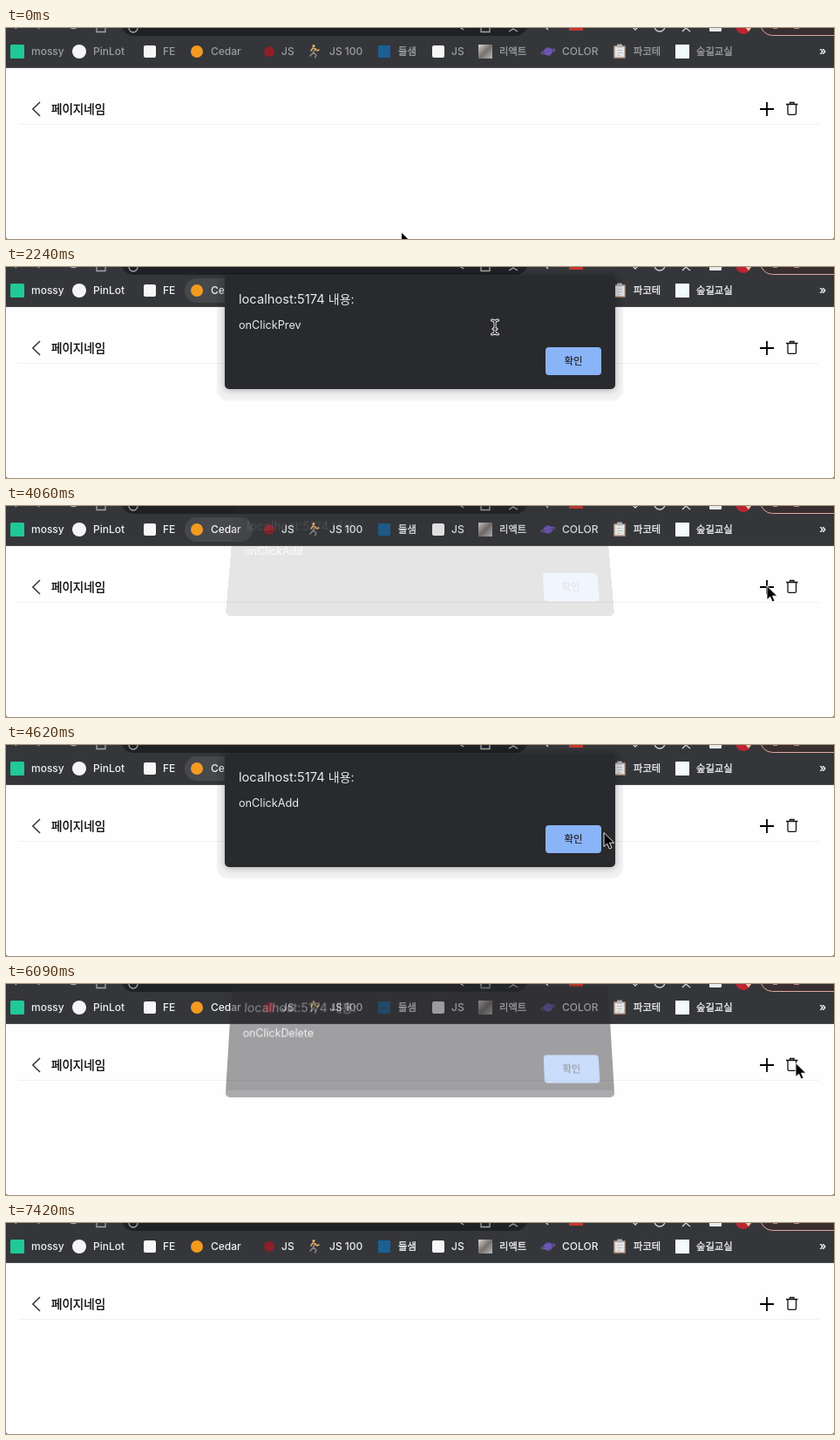
Animation of 950x242 px, one loop 7700 ms. Source, as an HTML page:

```html
<!DOCTYPE html>
<html lang="ko">
<head>
<meta charset="utf-8">
<title>Page header alerts</title>
<style>
  html, body { margin: 0; width: 950px; height: 242px; overflow: hidden; background: #fefefe; }
  svg { position: absolute; left: 0; top: 0; display: block; overflow: visible; }
  #stage { position: relative; width: 950px; height: 242px; overflow: hidden; }
  text { font-family: Inter, "Noto Sans CJK KR", "Noto Sans CJK", sans-serif; white-space: pre; }
  #marks text { font-size: 12px; font-weight: 500; }
  /* a hairline stroke gives the Hangul a medium weight */
  #marks text.ko { font-size: 11.3px; stroke-width: .3px; }
  #dialog {
    position: absolute; left: 251px; top: 10px; width: 448px; height: 130px;
    border-radius: 5px; background: #292a2d; transform-origin: 50% 100%;
  }
  #dialog.settled { box-shadow: 0 1px 7px rgba(0,0,0,.3), 0 4px 2px 9px rgba(0,0,0,.055); }
  #strip {
    position: absolute; left: 0; right: 0; bottom: 0; height: 8px;
    border-radius: 0 0 5px 5px; background: rgba(255,255,255,.12);
  }
</style>
</head>
<body>
<div id="stage">
  <svg width="950" height="242" viewBox="0 0 950 242">
    <rect width="950" height="45" fill="#35363a"/>
    <path d="M0 45.500H950" stroke="#505155"/>

    <!-- lower edge of the toolbar -->
    <rect x="132" y="-20" width="467" height="29" rx="14.5" fill="#202124"/>
    <g fill="none" stroke="#a4a6a9" stroke-width="1.300">
      <path d="M8 -3L12 1M37 1L41 -3M72 -3A6 6 0 0 0 83 -3M104 -4V4.500H114V-4"/>
      <path d="M141 0A5 5 0 0 0 151 0M519 -2L525 2M545 -4V4.500H555V-4M577 4L582 1L587 4"/>
      <path d="M618 -2L622 2M717 -3L722 2L726 -2M744 -2A6 6 0 0 0 756 -2M776 4L780 0L785 4" stroke="#d5d7da"/>
    </g>
    <rect x="646" y="-9" width="16" height="12" fill="#c8372d"/>
    <rect x="807" y="-8" width="14" height="12" rx="1" fill="#e9eaec"/>
    <circle cx="846" cy="-2" r="9" fill="#bd2430"/>
    <path d="M847 -2L855 0L852 4Z" fill="#e2c9b8"/>
    <rect x="865.500" y="-19.500" width="110" height="28" rx="14" fill="#392f31" stroke="#dfa8a2"/>
    <path d="M880 0H885M904 0H910" stroke="#dfa8a2" stroke-width="1.500"/>

    <rect id="hover" x="205" y="13" width="78" height="28" rx="14" fill="#47484c"/>

    <g id="icons">
      <rect x="5" y="19" width="16" height="16" rx="1.500" fill="#20c997"/>
      <circle cx="84" cy="27" r="8" fill="#f5f5f5"/>
      <rect x="158" y="20" width="14" height="14" rx="2" fill="#f7f7f7"/>
      <circle cx="219" cy="27" r="7" fill="#f39a20"/>
      <circle cx="302" cy="27" r="6" fill="#8c2029"/>
      <g fill="none" stroke-linecap="round" stroke-linejoin="round" stroke-width="1.600">
        <path d="M355 24L352.500 28L356 31L354.500 34M352.500 28L349 32" stroke="#8b8784"/>
        <path d="M350 26L352 23L355 24L357 26L359 25" stroke="#e0a95c"/>
        <circle cx="353" cy="20.500" r=".8" stroke="#e5b873"/>
      </g>
      <rect x="427" y="20" width="14" height="14" fill="#1c5f92"/>
      <rect x="489" y="20" width="14" height="14" rx="2" fill="#f7f7f7"/>
      <rect x="542" y="19" width="16" height="16" fill="url(#photo)"/>
      <circle cx="622" cy="27" r="4.800" fill="#6550ad"/>
      <ellipse cx="622" cy="27" rx="8" ry="1.700" fill="none" stroke="#7861bd" stroke-width="1.100" transform="rotate(-15 622 27)"/>
      <rect x="697" y="20" width="14" height="15" rx="1" fill="#9c7c69"/>
      <rect x="698.500" y="21.500" width="11" height="12" fill="#e6e6e6"/>
      <rect x="701" y="18.500" width="6" height="4" rx="1" fill="#b0b3b7"/>
      <path d="M701 25.500H707M701 28.500H707M701 31.500H705" stroke="#bcc0c4"/>
      <rect x="768" y="19" width="16" height="16" fill="#f3fafd"/>
    </g>
    <g id="marks"></g>
    <text x="933" y="31" font-size="13" font-weight="600" fill="#f1f2f3">»</text>

    <!-- page header -->
    <path d="M39 85L30.800 93L39 101" fill="none" stroke="#333" stroke-width="1.500"/>
    <text x="52" y="97.500" font-size="13.500" fill="#000" stroke="#000" stroke-width=".3">페이지네임</text>
    <path d="M865 93H881M873 85V101" stroke="#000" stroke-width="1.800"/>
    <path d="M895 87.500H908.500M899.500 87V85.500H904V87M897 88V98Q897 99.300 898.300 99.300H905.200Q906.500 99.300 906.500 98V88" fill="none" stroke="#111" stroke-width="1.300"/>
    <path d="M14 110.500H933" stroke="#f1f1f1"/>
    <path d="M0 240Q0 242 2 242H0ZM950 240Q950 242 948 242H950Z" fill="#333"/>

    <defs>
      <linearGradient id="photo" x2="1" y2="1">
        <stop stop-color="#d9d5d1"/><stop offset=".5" stop-color="#77706c"/><stop offset="1" stop-color="#b8b9bc"/>
      </linearGradient>
    </defs>
  </svg>

  <div id="dialog">
    <svg width="448" height="130" viewBox="251 10 448 130">
      <text x="267" y="42" font-size="14.700" fill="#e8eaed">localhost:5174 <tspan font-size="14">내용:</tspan></text>
      <text id="message" x="267" y="71" font-size="12.700" fill="#e8eaed"></text>
      <rect x="619" y="92" width="64" height="32" rx="4" fill="#8ab4f8"/>
      <text x="651" y="112" font-size="11.400" fill="#202124" stroke="#202124" stroke-width=".2" text-anchor="middle">확인</text>
    </svg>
    <div id="strip"></div>
  </div>

  <svg width="950" height="242" viewBox="0 0 950 242">
    <g id="cursor">
      <path id="arrow" d="M0 -.5V15.500L3.700 12.200L6.300 18L9 16.800L6.500 11.200H11.800Z" fill="#000" stroke="#fff" stroke-width=".9" stroke-linejoin="round"/>
      <g id="beam" fill="none" stroke-linecap="round">
        <path d="M-3.500 -8Q0 -8 0 -5V5Q0 8 -3.500 8M3.500 -8Q0 -8 0 -5V5Q0 8 3.500 8M-2 2H2" stroke="#fff" stroke-width="3"/>
        <path d="M-3.500 -8Q0 -8 0 -5V5Q0 8 -3.500 8M3.500 -8Q0 -8 0 -5V5Q0 8 3.500 8M-2 2H2" stroke="#111" stroke-width="1.200"/>
      </g>
    </g>
  </svg>
</div>

<script>
const LOOP = 7700, STEP = 70, LAST = 7420;
const $ = id => document.getElementById(id);

const bookmarks = [
  [29, "mossy"], [100, "PinLot"], [180, "FE"], [235, "Cedar"], [316, "JS"],
  [371, "JS 100"], [450, "들샘"], [511, "JS"], [566, "리액트"], [638, "COLOR"],
  [720, "파코테"], [792, "숲길교실"]
];
for (const [x, label] of bookmarks) {
  const el = document.createElementNS("http://www.w3.org/2000/svg", "text");
  el.setAttribute("x", x);
  el.setAttribute("y", 31);
  if (/[가-힣]/.test(label)) el.setAttribute("class", "ko");
  else el.setAttribute("stroke", "none");
  el.textContent = label;
  $("marks").append(el);
}

// time, x, y of the pointer
const path = [
  [0, 453.5, 234.5], [70, 453.5, 228], [280, 455, 159], [630, 455, 159],
  [1400, 42, 92], [1750, 42, 92], [1960, 235, 30], [2240, 561, 69],
  [2450, 650, 104], [2660, 650, 104], [3080, 631, 100], [3150, 631, 100],
  [3780, 873, 92], [4130, 873, 92], [4620, 686, 101], [4760, 664, 105],
  [5040, 664, 105], [5740, 906, 91], [6160, 906, 91], [6580, 650, 106],
  [6860, 650, 106], [7280, 545, 197], [7350, 480, 226], [7420, 440, 262]
];

const alerts = [
  { open: 1680, close: 2590, text: "onClickPrev" },
  { open: 4060, close: 4900, text: "onClickAdd" },
  { open: 6020, close: 6790, text: "onClickDelete" }
];
// opacity and tilt on successive steps of the opening
const poses = [[.12, 1], [.45, .7], [.8, .38], [1, .12], [1, 0]];

const rate = (i, c) => (path[i + 1][c] - path[i][c]) / (path[i + 1][0] - path[i][0]);

function slope(i, c) {
  if (i === 0 || i === path.length - 1) return 0;
  const a = rate(i - 1, c), b = rate(i, c);
  return a * b <= 0 ? 0 : 2 * a * b / (a + b);
}

function pointer(t) {
  let i = 0;
  while (i < path.length - 2 && t >= path[i + 1][0]) i++;
  const span = path[i + 1][0] - path[i][0];
  const u = (t - path[i][0]) / span, v = 1 - u;
  return [1, 2].map(c =>
    v * v * (1 + 2 * u) * path[i][c] + u * u * (3 - 2 * u) * path[i + 1][c] +
    span * u * v * (v * slope(i, c) - u * slope(i + 1, c)));
}

function drawDialog(t) {
  const box = $("dialog");
  const alert = alerts.find(a => t >= a.open && t < a.close + 4 * STEP);
  box.style.display = alert ? "block" : "none";
  if (!alert) return false;
  const k = t < alert.close
    ? Math.min(4, Math.floor((t - alert.open) / STEP))
    : 3 - Math.floor((t - alert.close) / STEP);
  const [alpha, tilt] = poses[k];
  $("message").textContent = alert.text;
  box.style.opacity = alpha;
  box.classList.toggle("settled", k > 2);
  $("strip").style.display = k === 1 || k === 2 ? "block" : "none";
  box.style.transform = tilt
    ? `translateY(${-14.3 * tilt}px) matrix3d(1,0,0,0, 0,${1 + .04 * tilt},0,${-.0004 * tilt}, 0,0,1,0, 0,0,0,${1 + .004 * tilt})`
    : "none";
  return k === 4;
}

function draw(time) {
  const t = Math.min(LAST, Math.floor(time % LOOP / STEP) * STEP);

  // the window gains focus at the start
  const focus = Math.min(1, t / 280);
  const mix = (a, b) => Math.round(a + (b - a) * focus);
  const ink = `rgb(${mix(156, 240)},${mix(157, 241)},${mix(159, 243)})`;
  $("marks").setAttribute("fill", ink);
  $("marks").setAttribute("stroke", ink);
  $("hover").style.display = t >= 1960 && t < 5110 ? "" : "none";

  const open = drawDialog(t);
  const [x, y] = pointer(t);
  const overText = open && Math.abs(y - 67) < 10 && x > 265 && x < 685;
  $("cursor").setAttribute("transform", `translate(${x.toFixed(1)} ${y.toFixed(1)})`);
  $("arrow").style.display = overText ? "none" : "";
  $("beam").style.display = overText ? "" : "none";
}

const start = performance.now();
function tick() {
  draw(performance.now() - start);
  requestAnimationFrame(tick);
}
tick();
</script>
</body>
</html>
```
